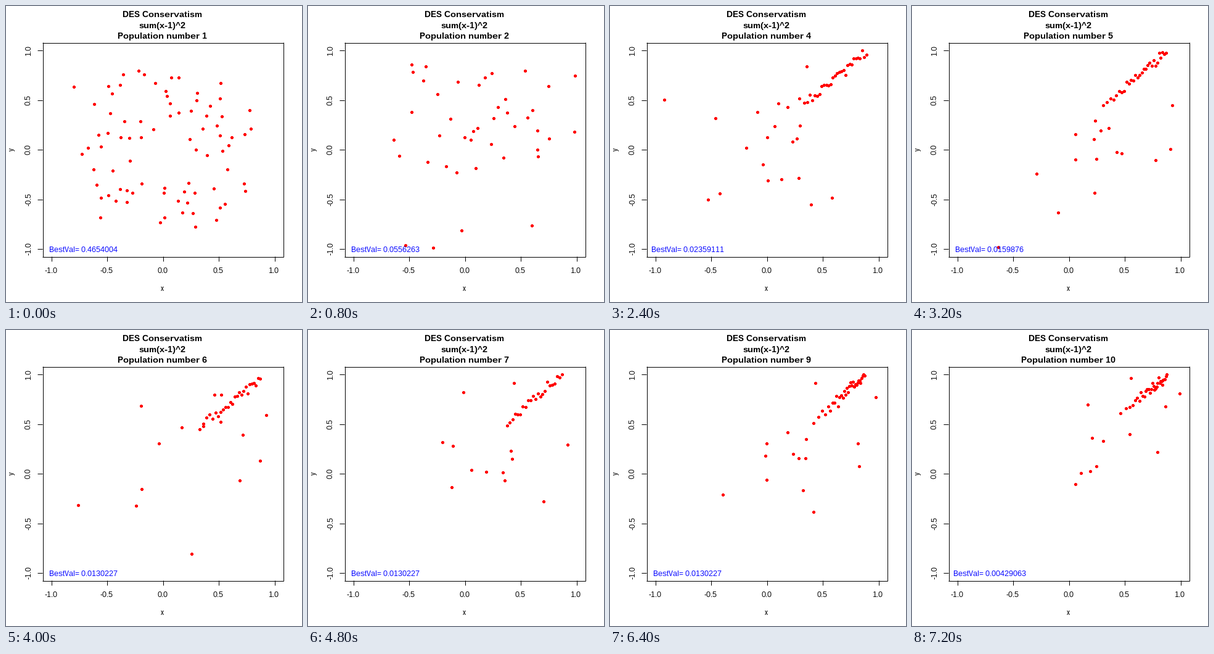
Recreate the animation shown at these times as a matplotlib script. Size 480 px wide and 480 px high, loop 8000 ms.

```python
import matplotlib.pyplot as plt
import numpy as np
from matplotlib.animation import FuncAnimation
from matplotlib.collections import PolyCollection

SIZE, DPI = 480, 96
PX = 72 / DPI                                # one pixel in points
LEFT, RIGHT, TOP, BOTTOM = 59, 449, 59, 406  # plot box
TICKS = (-1.0, -0.5, 0.0, 0.5, 1.0)


def plus(a, b):
    """Corners of a plus with arms a..b; it fills a round five pixel dot."""
    lo, hi = a - 1, b + 1
    return np.array([(a, lo), (b, lo), (b, a), (hi, a), (hi, b), (b, b),
                     (b, hi), (a, hi), (a, b), (lo, b), (lo, a), (a, a)])


DOT = plus(-1, 2)


def to_px(x, y):
    """Data coordinates to stage pixels."""
    return 254.4 + 180.89 * x, 232.8 - 160.89 * y


populations = []


def scatter(rng, n, box, taken, gap=8):
    """n random points in the box, kept apart from each other and the rest."""
    x0, x1, y0, y1 = box
    points = list(taken)
    while len(points) < len(taken) + n:
        p = rng.uniform((x0, y0), (x1, y1))
        if all(np.hypot(*(p - q)) > gap for q in points):
            points.append(p)
    return points


def diagonal(rng, n, start, power):
    """n points climbing to the optimum, denser at the end for low powers."""
    u = (np.arange(n) + 0.5) / n
    x = start + (414 - start) * u ** power
    y = 75 + 0.86 * (414 - x) + rng.normal(0, 5, n)
    return np.column_stack([x, np.maximum(y, 72)])


def population(best, pins, n_wide, box, n_line=0, start=320, power=1.0):
    """Outlying pins, a loose cloud and a band along the diagonal."""
    rng = np.random.default_rng(len(populations) + 1)
    points = scatter(rng, n_wide, box, np.array(pins, float))
    points = np.vstack([points, diagonal(rng, n_line, start, power)])
    populations.append((best, np.floor(points)))


population("0.4654004", [(110, 131), (215, 105), (397, 199), (307, 358)],
           76, (112, 397, 110, 356))
population("0.0556263", [(139, 217), (158, 388), (203, 392), (249, 364),
                         (363, 356), (433, 113), (432, 204)],
           36, (143, 400, 88, 275))
population("0.0556263", [(74, 286)], 28, (120, 410, 80, 340), 14, 310)
population("0.02359111", [(88, 152), (159, 314), (178, 304), (326, 322),
                          (360, 311), (319, 98), (171, 182), (416, 79)],
           14, (202, 310, 138, 290), 28, 313, 0.9)
population("0.0159876", [(140, 391), (237, 335), (202, 272), (296, 303),
                         (395, 250), (419, 232), (422, 161)],
           9, (261, 350, 183, 250), 29, 305, 0.75)
population("0.0130227", [(117, 284), (422, 138), (301, 363)],
           12, (210, 415, 80, 290), 26, 310, 0.8)
population("0.0130227", [(218, 182), (235, 188), (252, 101), (421, 186),
                         (382, 278), (334, 86), (319, 244), (233, 255)],
           5, (265, 348, 185, 237), 23, 321, 0.95)
population("0.0130227", [(262, 236)], 8, (235, 415, 80, 260), 30, 315, 0.7)
population("0.0130227", [(183, 267), (330, 295), (402, 184), (404, 221),
                         (431, 109), (333, 86), (313, 260), (254, 243)],
           7, (252, 328, 163, 213), 32, 318, 0.5)
population("0.00429063", [(265, 250), (285, 121), (355, 78), (398, 198),
                          (411, 124), (434, 103), (274, 232), (353, 169)],
           4, (272, 312, 167, 232), 31, 325, 0.45)


fig = plt.figure(figsize=(SIZE / DPI, SIZE / DPI), dpi=DPI, facecolor="white")
ax = fig.add_axes([0, 0, 1, 1])
ax.set_xlim(0, SIZE)
ax.set_ylim(SIZE, 0)
ax.axis("off")

plt.rcParams.update({
    "font.family": "Liberation Sans",
    "text.hinting": "default",
    "text.hinting_factor": 1,
    "text.kerning_factor": 6,
})


def line(x0, y0, x1, y1):
    ax.plot([x0, x1], [y0, y1], color="black", lw=PX, solid_capstyle="butt")


def label(x, y, text, px=12, **style):
    style = {"ha": "center", "va": "baseline", "color": "black", **style}
    return ax.text(x, y, text, fontsize=px * PX, **style)


def heading(y, text=""):
    return label(253.7, y, text, 14, weight="bold")


def draw_axes():
    for x in (LEFT, RIGHT):
        line(x + 0.5, TOP, x + 0.5, BOTTOM + 1)
    for y in (TOP, BOTTOM):
        line(LEFT, y + 0.5, RIGHT + 1, y + 0.5)
    for v in TICKS:
        x, y = to_px(v, v)
        tx, ty = int(x) + 0.5, int(y) + 0.5
        line(tx, BOTTOM, tx, BOTTOM + 8)
        line(LEFT - 8, ty, LEFT, ty)
        label(x - 0.5, 433, f"{v:.1f}")
        label(42, y, f"{v:.1f}", rotation=90, ha="right", va="center")
    label(253.7, 462, "x")
    label(15, 232.5, "y", rotation=90, ha="right", va="center")


draw_axes()
heading(18, "DES Conservatism")
heading(36, "sum(x-1)^2")
counter = heading(53)
best_text = label(70, 399, "", color="blue", ha="left", zorder=4)
dots = PolyCollection([], facecolors="red", edgecolors="none", linewidths=0,
                      zorder=3)
ax.add_collection(dots, autolim=False)


def update(i):
    best, centres = populations[i]
    dots.set_verts(centres[:, None, :] + DOT)
    counter.set_text(f"Population number {i + 1}")
    best_text.set_text(f"BestVal= {best}")
    best_text.set_x(70 if len(best) == 9 else 67)
    return dots, counter, best_text


anim = FuncAnimation(fig, update, frames=len(populations), interval=800,
                     init_func=lambda: update(0), repeat=True, repeat_delay=0)
plt.show()
```
